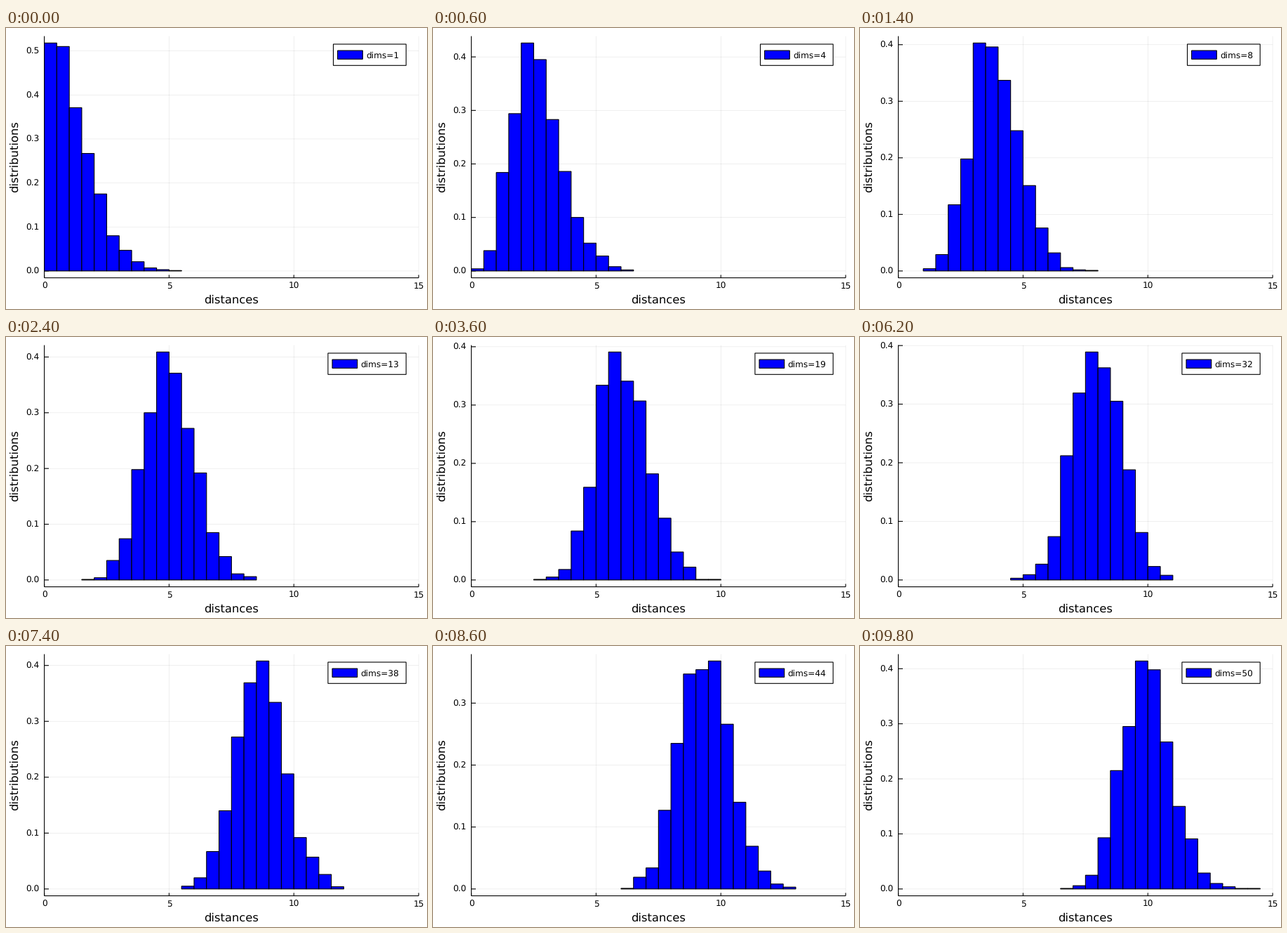
Write a matplotlib script that moves like this. It is 600 px wide and 400 px high and loops after 10 s.

```python
import numpy as np
import matplotlib.pyplot as plt
from matplotlib.animation import FuncAnimation
from matplotlib.patches import Rectangle

plt.rcParams.update({"font.family": "DejaVu Sans", "text.hinting": "none",
                     "path.snap": False})

W, H, DPI = 600, 400, 100
LEFT, RIGHT, TOP, BOTTOM = 54.6, 588.1, 11.6, 355.6
X_MAX, BIN, SAMPLES = 15, 0.5, 2000
PAD = 0.03
BLUE = "#0000ff"
PT = 72 / DPI
SMALL, LARGE = 12.1 * PT, 16.4 * PT

fig = plt.figure(figsize=(W / DPI, H / DPI), dpi=DPI, facecolor="white")
ax = fig.add_axes([0, 0, 1, 1])


def histogram(dims):
    """First bin and densities of distances between random normal points."""
    rng = np.random.default_rng(dims)
    a, b = rng.standard_normal((2, SAMPLES, dims))
    bins = (np.linalg.norm(a - b, axis=1) / BIN).astype(int)
    first = bins.min()
    return first, np.bincount(bins - first) / (SAMPLES * BIN)


def x_px(x):
    return LEFT + (RIGHT - LEFT) * x / X_MAX


def line(x0, y0, x1, y1, width=1.1, **style):
    ax.plot([x0, x1], [y0, y1], color="black", lw=width * PT,
            solid_capstyle="butt", **style)


def grid_line(*ends):
    line(*ends, width=0.6, alpha=0.1, zorder=0.5)


def box(x0, y0, x1, y1, fill, zorder):
    ax.add_patch(Rectangle((x0, y0), x1 - x0, y1 - y0, facecolor=fill,
                           edgecolor="black", lw=1.1 * PT, zorder=zorder))


def label(x, y, text, size=SMALL, ha="center", **style):
    ax.text(x, y, text, size=size, ha=ha, va="baseline", zorder=6, **style)


def draw_axes(y_px, y_top):
    for x in range(0, X_MAX + 1, 5):
        px = x_px(x)
        grid_line(px, TOP, px, BOTTOM)
        line(px, BOTTOM, px, BOTTOM - 4.1, zorder=1)
        label(px, 371, str(x))
    for k in range(int(y_top * 10) + 1):
        py = y_px(k / 10)
        grid_line(LEFT, py, RIGHT, py)
        line(LEFT, py, LEFT + 6.4, py, zorder=1)
        label(47.6, py + 4.4, f"{k / 10:.1f}", ha="right")
    line(LEFT, TOP, LEFT, BOTTOM, zorder=1)
    line(LEFT, BOTTOM, RIGHT, BOTTOM, zorder=1)
    label((LEFT + RIGHT) / 2, 392, "distances", LARGE)
    label(16.5, (TOP + BOTTOM) / 2 - 0.6, "distributions", LARGE,
          rotation=90, rotation_mode="anchor")


def draw_legend(dims):
    x = 474.1 - 7.6 * len(str(dims))
    box(x, 23, 570.2, 53.3, "white", 4)
    box(x + 6.1, 32.1, x + 41.8, 44.3, BLUE, 5)
    label(x + 46.8, 43, f"dims={dims}", ha="left")


def draw(frame):
    dims = frame + 1
    first, heights = histogram(dims)
    peak = heights.max()
    scale = (BOTTOM - TOP) / (peak * (1 + 2 * PAD))

    def y_px(y):
        return BOTTOM - (y + PAD * peak) * scale

    ax.clear()
    ax.set(xlim=(0, W), ylim=(H, 0))
    ax.axis("off")
    draw_axes(y_px, peak * (1 + PAD))
    for i, h in enumerate(heights):
        x = (first + i) * BIN
        if x < X_MAX:
            box(x_px(x), y_px(h), x_px(x + BIN), y_px(0), BLUE, 2)
    draw_legend(dims)
    return []


anim = FuncAnimation(fig, draw, frames=50, interval=200, repeat=True,
                     repeat_delay=0, init_func=lambda: draw(0))
plt.show()
```
